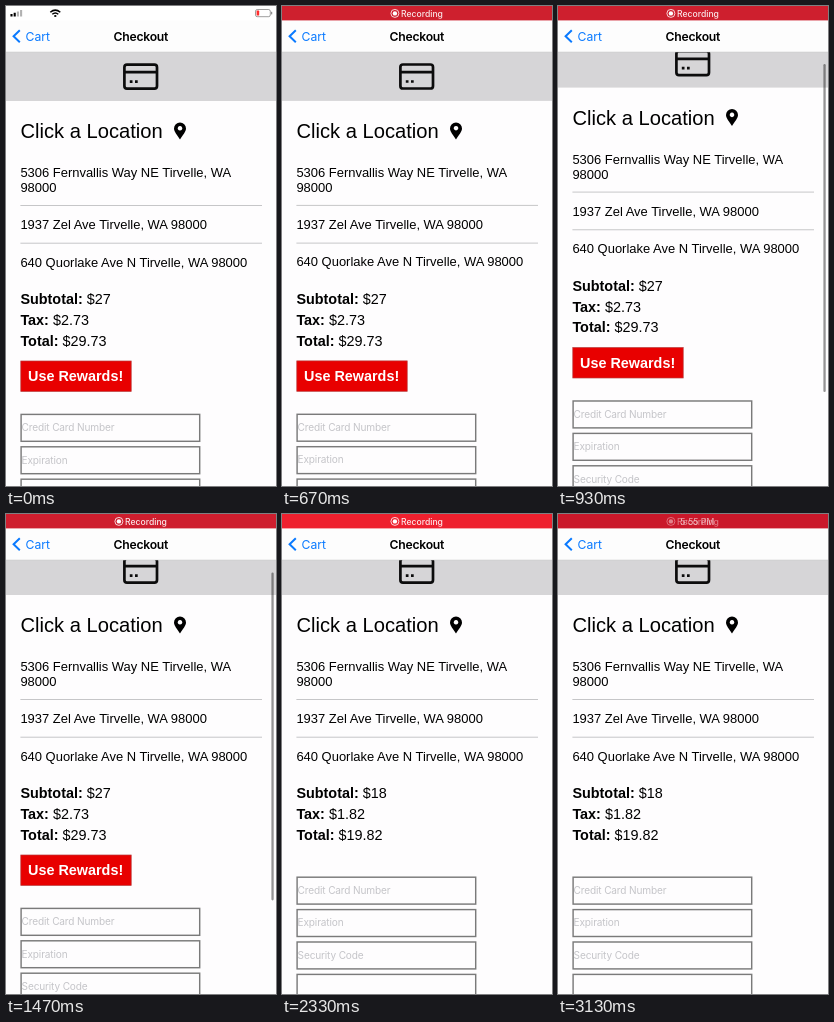
Animation of 270x480 px, one loop 3.19 s. Source, as an HTML page:

```html
<!DOCTYPE html>
<html lang="en">
<head>
<meta charset="utf-8">
<title>Checkout</title>
<style>
  html, body { margin: 0; height: 100%; overflow: hidden; background: #fefdfe; }
  svg { display: block; width: 100vw; height: 100vh; }
  text { font: 12.96px "Liberation Sans", Arial, sans-serif; white-space: pre; }
  .title { font-size: 20.16px; }
  .sum { font-size: 14.4px; }
  .bold { font-size: 14.4px; font-weight: bold; }
  .hint { font: 10.08px Inter, sans-serif; letter-spacing: -.15px; fill: #c5c5c9; }
  .nav { font: 12.2px Inter, sans-serif; }
  .heading { font-weight: 600; letter-spacing: -.25px; }
  .status { font: 500 8.64px Inter, sans-serif; fill: #fff; }
</style>
</head>
<body>
<svg viewBox="0 0 270 480">
  <rect width="270" height="480" fill="#fefdfe"/>
  <g id="page">
    <rect y="40" width="270" height="55" fill="#d6d5d7"/>
    <g fill="none" stroke="#0c0c0c" stroke-width="2.7">
      <rect x="118.4" y="58.6" width="32.6" height="24" rx="2.6"/>
      <path d="M118 66.2h33"/>
      <path d="M123.8 75.6h2.7M129 75.6h2.7"/>
    </g>
    <text class="title" x="14.4" y="132">Click a Location</text>
    <path fill-rule="evenodd" d="M174 133.5C171.5 129 168 126 168 122.5a6 6 0 0 1 12 0C180 126 176.5 129 174 133.5zM174 120a2.3 2.3 0 1 0 .01 0z"/>
    <text x="14.4" y="171">5306 Fernvallis Way NE Tirvelle, WA</text>
    <text x="14.4" y="186">98000</text>
    <text x="14.4" y="223">1937 Zel Ave Tirvelle, WA 98000</text>
    <text x="14.4" y="260.5">640 Quorlake Ave N Tirvelle, WA 98000</text>
    <path d="M14.4 199.5H256M14.4 237.2H256" stroke="#c6c6c8"/>
    <g id="sums"></g>
    <g id="button">
      <rect x="14.8" y="355" width="110.4" height="30.4" fill="#e80000" stroke="#b83838" stroke-width=".7"/>
      <text class="bold" x="22" y="375.2" fill="#fff">Use Rewards!</text>
    </g>
    <g id="form"></g>
  </g>
  <rect id="scrollbar" x="265.4" width="2.3" height="328" rx="1.15" fill="#000" fill-opacity=".42"/>

  <rect width="270" height="46" fill="#fdfdfd"/>
  <path d="M0 46h270" stroke="#c4c4c6" stroke-width=".5"/>
  <path d="M13.8 24.2L7.6 30.2l6.2 6" fill="none" stroke="#0a7aff" stroke-width="2"/>
  <text class="nav" x="19.5" y="34.6" fill="#0a7aff">Cart</text>
  <text class="nav heading" x="134.8" y="34.6" text-anchor="middle">Checkout</text>

  <rect id="bar" width="270" height="14.4"/>
  <g id="icons">
    <path d="M5.5 10.5v-2.5M8.7 10.5v-3.7" stroke="currentColor" stroke-width="2.1"/>
    <path d="M11.9 10.5v-5M15.1 10.5v-6.5" stroke="currentColor" stroke-width="2.1" opacity=".3"/>
    <g fill="none" stroke="currentColor" stroke-width="1.5">
      <path d="M44.3 6.3q5-4.4 10 0M46.3 8.3q3-2.6 6 0"/>
      <path d="M48.3 10h2" stroke-width="1.8"/>
    </g>
    <rect x="249.5" y="3.5" width="14.8" height="7.2" rx="1.8" fill="none" stroke="currentColor" stroke-width=".7" opacity=".55"/>
    <path d="M265.7 5.8v2.6" stroke="currentColor" opacity=".55"/>
    <rect x="250.6" y="4.6" width="2.6" height="5" rx=".6" fill="#ff2d2d"/>
  </g>
  <g id="labels">
    <text class="status" x="19" y="11">ZL&amp;Q</text>
    <text class="status" x="247" y="11" text-anchor="end">17%</text>
    <circle cx="61.8" cy="7.2" r="2.9" fill="none" stroke="#fff" stroke-width="1.8" stroke-dasharray=".8 1.48" opacity=".4"/>
  </g>
  <text id="clock" class="status" x="139.3" y="11" text-anchor="middle">5:55 PM</text>
  <g id="recording">
    <circle cx="112.9" cy="7.4" r="4" fill="none" stroke="#fff" stroke-width=".8"/>
    <circle cx="112.9" cy="7.4" r="2.2" fill="#fff"/>
    <text class="status" x="119" y="10.8" fill-opacity=".88">Recording</text>
  </g>
</svg>
<script>
const LOOP = 3190, TAP = 2070, APPLIED = 2200;
const $ = id => document.getElementById(id);
const set = (id, name, value) => $(id).setAttribute(name, value);
const ramp = (t, from, to) => Math.min(1, Math.max(0, (t - from) / (to - from)));

// Status bar colour over time: [ms, r, g, b]
const barColors = [
  [0, 255, 255, 255], [70, 255, 255, 255], [270, 245, 92, 96], [450, 236, 36, 48],
  [640, 206, 32, 46], [1630, 206, 30, 46], [2130, 238, 32, 46], [2340, 238, 32, 46],
  [2670, 202, 24, 42], [LOOP, 202, 24, 42]
];

function barColor(t) {
  const i = barColors.findIndex(k => k[0] > t);
  const [a, b] = [barColors[i - 1], barColors[i]];
  const p = ramp(t, a[0], b[0]);
  return `rgb(${[1, 2, 3].map(c => a[c] + (b[c] - a[c]) * p)})`;
}

$('form').innerHTML = ['Credit Card Number', 'Expiration', 'Security Code', '', ''].map((hint, i) => {
  const y = 408.4 + i * 32.4;
  return `<rect x="15.1" y="${y}" width="178.6" height="26.9" fill="none" stroke="#7a7a7a" stroke-width="1.44"/>
    <text class="hint" x="15.6" y="${y + 16.8}">${hint}</text>`;
}).join('');

let shownSums;
function showSums(values) {
  if (shownSums === values.join()) return;
  shownSums = values.join();
  $('sums').innerHTML = ['Subtotal', 'Tax', 'Total'].map((name, i) =>
    `<text class="sum" x="14.4" y="${298.3 + i * 20.8}"><tspan class="bold">${name}:</tspan> $${values[i]}</text>`
  ).join('');
}

function render(t) {
  const applied = t >= APPLIED;
  const scroll = 14 * (1 - (1 - ramp(t, 670, 1070)) ** 3);
  set('page', 'transform', `translate(0 ${-scroll})`);
  set('scrollbar', 'y', 48 + scroll * .75);
  set('scrollbar', 'opacity', ramp(t, 680, 760) - ramp(t, 1700, 1950));

  showSums(applied ? ['18', '1.82', '19.82'] : ['27', '2.73', '29.73']);
  set('button', 'opacity', applied ? 0 : 1 - .8 * ramp(t, TAP, APPLIED));
  set('form', 'transform', `translate(0 ${applied ? -31.2 : 0})`);

  const fadeIn = ramp(t, 60, 330), toRecording = ramp(t, 400, 600), toClock = ramp(t, 3060, LOOP);
  const shade = 255 * fadeIn;
  set('bar', 'fill', barColor(t));
  set('icons', 'color', `rgb(${shade},${shade},${shade})`);
  set('icons', 'opacity', 1 - toRecording);
  set('labels', 'opacity', fadeIn * (1 - toRecording));
  set('clock', 'opacity', fadeIn * (1 - toRecording) + toClock);
  set('recording', 'opacity', toRecording - toClock);
}

function frame() {
  render(performance.now() % LOOP);
  requestAnimationFrame(frame);
}
frame();
</script>
</body>
</html>
```
